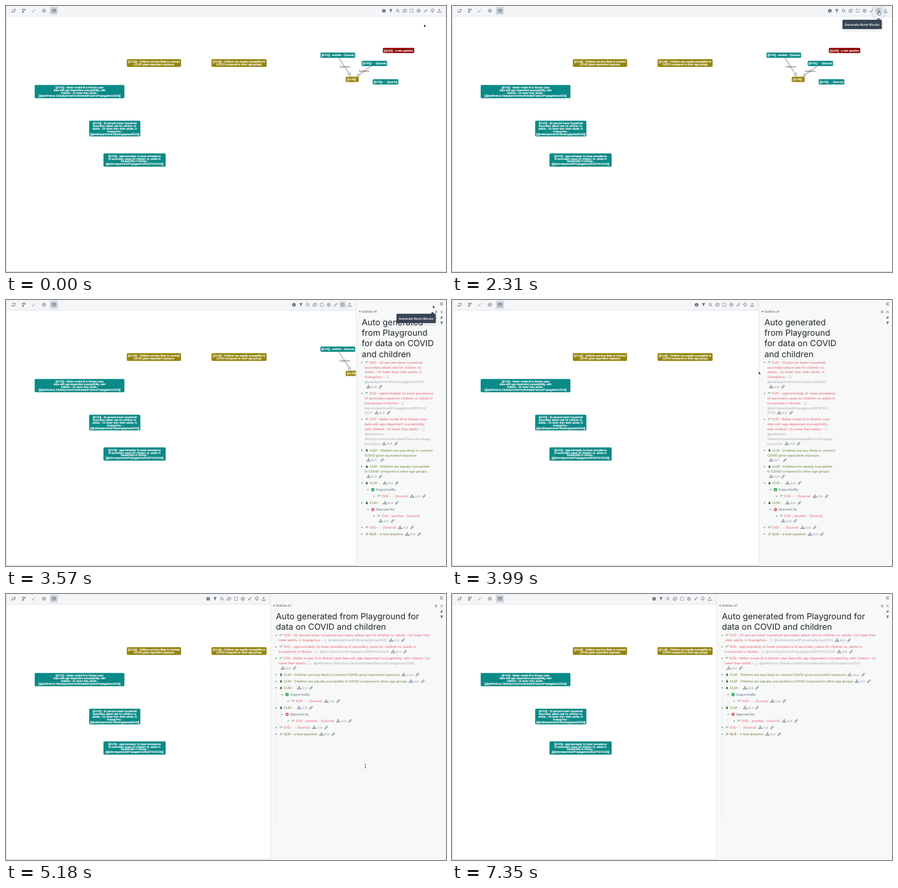
Write an HTML page that moves like this. It is 800x484 px and loops after 7.42 s.

```html
<!DOCTYPE html>
<html lang="en">
<head>
<meta charset="utf-8">
<title>Graph to outline</title>
<style>
html, body { margin: 0; width: 100%; height: 100%; overflow: hidden; background: #fff; }
svg { display: block; }
text { font-family: Inter, sans-serif; text-rendering: geometricPrecision; white-space: pre; }
.node { font: 4.92px "Liberation Sans", Arial, sans-serif; text-anchor: middle; fill: #fff; stroke: #fff; stroke-width: .24px; }
.edge { font: 4.8px "Liberation Sans", Arial, sans-serif; text-anchor: middle; fill: #444; }
.row { font-size: 5.92px; }
.count { font: 5.2px "Liberation Mono", monospace; fill: #7c868e; }
.title { font-size: 15.3px; fill: #20262b; }
.line { fill: none; stroke: #5f6b75; stroke-width: .85; }
.solid { fill: #5f6b75; }
.hover text.row { text-decoration: underline; }
</style>
</head>
<body>
<svg id="stage" width="800" height="484" viewBox="0 0 800 484"></svg>
<script>
const LOOP = 7420, FULL = 800, NARROW = 636.5, WIDE = 480.5;
const TEAL = '#0b8a87', OLIVE = '#94840e', RED = '#8b0000';
const stage = document.getElementById('stage');
const $ = id => document.getElementById(id);

const at = (x, y, body, scale = 1) => `<g transform="translate(${x} ${y}) scale(${scale})">${body}</g>`;
const line = (d, extra = '') => `<path class="line" d="${d}" ${extra}/>`;
const solid = (d, extra = '') => `<path class="solid" d="${d}" ${extra}/>`;
const dot = (r, cls = 'solid') => `<circle r="${r}" class="${cls}"/>`;

const icon = {
  path: solid('M-3.5 1h2v2h-2zM1-3h2v2h-2z') + line('M-1.5 2H2V-1M-3-2H0'),
  branch: line('M-1.5-3V3M-1.5 1.5Q2 1 2-1.5') + solid('M-2.7-3.5h2.2v2h-2.2zM-2.7 1.8h2.2v2h-2.2zM.9-3.2h2.2v2H.9z'),
  pencil: line('M-2.5 2.5L2-2', 'stroke-width="1.6"') + solid('M-3.2 3.2l.4-1.6 1.2 1.2z'),
  wheel: dot(2.9, 'line') + line('M-1.4-1.4L1.4 1.4M1.4-1.4L-1.4 1.4'),
  board: line('M-3-2.5H3V2.5H-3ZM-3-1.2H3M-.8.5H2'),
  info: dot(3.2) + '<path d="M0-1.8V-1M0-.3V1.9" stroke="#fff"/>',
  filter: solid('M-3-3H3L.8 0V3L-.8 2V0Z'),
  search: '<circle cx="-.6" cy="-.6" r="2.2" class="line"/>' + line('M1 1L3.2 3.2'),
  map: line('M-3-1.5V2.5H1M3 1.5V-2.5H-1M-2-3L2 3'),
  select: line('M-2.8-2.8H2.8V2.8H-2.8Z', 'stroke-dasharray="1.6 .8"'),
  target: dot(2.9, 'line') + dot(1.1),
  shrink: line('M.5-.5L3-3M-.5.5L-3 3') + solid('M.2-2.6V-.2H2.6ZM-.2 2.6V.2H-2.6Z'),
  make: line('M-1.5 1H-2.4A1.5 1.5 0 0 1-2-1.6 2 2 0 0 1 2-1.6 1.5 1.5 0 0 1 2.4 1H1.5M0-.5V3M-1.2 1.8L0 3L1.2 1.8'),
  send: line('M-3 1V3H3V1M0 1.5V-3M-1.5-1.5L0-3L1.5-1.5'),
  menu: line('M-3-2H3M-3 0H1.5M-3 2H3'),
  close: line('M-2-2L2 2M2-2L-2 2'),
  pin: solid('M0-2.7L2.7 0 1.6.3 0 2-2-.0-.3-1.6Z') + line('M-1 1L-2.6 2.6'),
  chart: line('M0-2V0M-2.7 1.5V0H2.7V1.5M0 0V1.5', 'style="stroke-width:.6"') + solid('M-.9-3H.9V-1.4H-.9ZM-3.5 1.2H-1.9V2.8H-3.5ZM-.8 1.2H.8V2.8H-.8ZM1.9 1.2H3.5V2.8H1.9Z'),
  link: '<g transform="rotate(-45)"><rect x="-3.4" y="-1.1" width="3.6" height="2.2" rx="1.1" class="line"/><rect x="-.2" y="-1.1" width="3.6" height="2.2" rx="1.1" class="line"/></g>',
  EVD: '<path d="M-2 2.5Q0 1.5 0-.5M0-.5Q-3 .2-3.2-2Q-.4-2.4 0-.5Q.5-3 3-2.4Q2.8 0 0-.5" fill="#79b873" stroke="#79b873" stroke-width=".4"/>',
  CLM: '<path d="M0-3.2L1.7-.6H1L2.5 2H-2.5L-1-.6H-1.7Z" fill="#27603a"/><path d="M-.5 2H.5V3H-.5Z" fill="#6b4a2b"/>',
  YES: '<rect x="-3.2" y="-3.2" width="6.4" height="6.4" rx="1" fill="#35a853"/><path d="M-1.6 0L-.4 1.4L1.7-1.5" fill="none" stroke="#fff" stroke-width=".9"/>',
  NO: '<circle r="3.1" fill="#d8343f"/><path d="M-1.9 0H1.9" stroke="#fff" stroke-width="1.4"/>',
  QUE: '<circle cx=".8" cy="-.8" r="1.7" fill="#d5e6ee" stroke="#666" stroke-width=".7"/><path d="M-.4.4L-2.6 2.6" stroke="#666"/>'
};
const cursors = {
  arrow: '<path d="M0 0V5.6L1.3 4.4L2.2 6.4L3.1 6L2.2 4.1H4Z" fill="#111" stroke="#fff" stroke-width=".5"/>',
  hand: '<path d="M-.7 0Q0-.8.7 0V2.5L3 3.2Q3.6 3.6 3.3 5L2.7 7H-1.2L-3 4.2Q-2.6 3.2-.7 4.4Z" fill="#fff" stroke="#222" stroke-width=".7"/>',
  beam: '<path d="M-1.5-3Q0-3 0-2Q0-3 1.5-3M0-2V3M-1.5 4Q0 4 0 3Q0 4 1.5 4" fill="none" stroke="#222" stroke-width=".7"/>'
};

const MODEL_CITE = ['pellmvirus-', '19studycirclesYouthrelatedFactorsPropaga', 'tions2020'];
const HOME_CITE = '@velkApartmentFollowingSpread2020', RESP_CITE = '@dornApartmentPropagationsRESPVir22020';
const nodes = [
  [220, 97, 98, 13.5, OLIVE, '[[CLM]] - Children are less likely to contract|COVID given equivalent exposure'],
  [374, 97, 99.5, 13.5, OLIVE, '[[CLM]] - Children are equally susceptible to|COVID compared to other age groups'],
  [52.5, 144, 162.5, 23.5, TEAL, '[[EVD]] - Better model fit to Wuhan case|data with age-dependent susceptibility, with|children ~2x lower than adults -|[[@' + MODEL_CITE.join('') + ']]'],
  [151.5, 209, 92.5, 28, TEAL, '[[EVD]] - 30 percent lower household|secondary attack rate for children vs.|adults, ~2x lower than older adults, in|Guangzhou -|[[' + HOME_CITE + ']]'],
  [177.5, 268.5, 112.5, 23.5, TEAL, '[[EVD]] - approximately 2x lower prevalence|of secondary cases for children vs. adults in|households in Wuhan -|[[' + RESP_CITE + ']]'],
  [572, 85, 62.5, 9, TEAL, '[[EVD]] - another - (Source)'],
  [647, 100, 45.5, 9, TEAL, '[[EVD]] -  - (Source)'],
  [685.5, 76.5, 56.5, 8.7, RED, '[[QUE]] - a new question'],
  [667, 133.5, 46, 9, TEAL, '[[EVD]] -  - (Source)'],
  [618, 129, 23, 9, OLIVE, '[[CLM]] -']
];
function drawNode([x, y, w, h, color, label]) {
  const lines = label.split('|');
  return `<rect x="${x}" y="${y}" width="${w}" height="${h}" rx="1.5" fill="${color}" stroke="${color}" stroke-opacity=".6"/>` +
    lines.map((s, i) => `<text class="node" x="${x + w / 2}" y="${y + h / 2 + 1.75 + (i - (lines.length - 1) / 2) * 4.9}">${s}</text>`).join('');
}

// kind, indent, narrow lines, wide lines, count; "{" starts grey citation text
const rows = [
  ['EVD', 0, `EVD - 30 percent lower household|secondary attack rate for children vs.|adults, ~2x lower than older adults, in|Guangzhou - {❏|{${HOME_CITE}|`,
    `EVD - 30 percent lower household secondary attack rate for children vs. adults, ~2x lower than|older adults, in Guangzhou - {❏  ${HOME_CITE}`, '8|5'],
  ['EVD', 0, `EVD - approximately 2x lower prevalence|of secondary cases for children vs. adults in|households in Wuhan - {❏|{${RESP_CITE.slice(0, -4)}|{2020`,
    `EVD - approximately 2x lower prevalence of secondary cases for children vs. adults in|households in Wuhan - {❏  ${RESP_CITE}`, '8|5'],
  ['EVD', 0, `EVD - Better model fit to Wuhan case|data with age-dependent susceptibility,|with children ~2x lower than adults - {❏|{@${MODEL_CITE.join('|{')}`,
    `EVD - Better model fit to Wuhan case data with age-dependent susceptibility, with children ~2x|lower than adults - {❏  @${MODEL_CITE.join('')}|`, '8|5'],
  ['CLM', 0, 'CLM - Children are less likely to contract|COVID given equivalent exposure|', 'CLM - Children are less likely to contract COVID given equivalent exposure', '14|3'],
  ['CLM', 0, 'CLM - Children are equally susceptible|to COVID compared to other age groups|', 'CLM - Children are equally susceptible to COVID compared to other age groups', '3|5'],
  ['CLM', 0, 'CLM -  ', 'CLM -  ', '0|0'],
  ['YES', 1, 'SupportedBy', 'SupportedBy'],
  ['EVD', 2, 'EVD -  - (Source)', 'EVD -  - (Source)', '1|0'],
  ['CLM', 0, 'CLM -  ', 'CLM -  ', '0|0'],
  ['NO', 1, 'Opposed By', 'Opposed By'],
  ['EVD', 2, 'EVD - another - (Source)|', 'EVD - another - (Source)', '1|0'],
  ['EVD', 0, 'EVD -  - (Source)', 'EVD -  - (Source)', '1|0'],
  ['QUE', 0, 'QUE - a new question', 'QUE - a new question', '0|0']
];
const rowStyle = {
  EVD: 'fill="#e65a6b"', CLM: 'fill="#7f9350" font-weight="500"', QUE: 'fill="#87854a" font-weight="500"',
  YES: 'fill="#587489"', NO: 'fill="#587489"'
};

const probe = document.createElementNS('http://www.w3.org/2000/svg', 'text');
function textWidth(s, weight) {
  probe.setAttribute('class', 'row');
  probe.setAttribute('font-weight', weight);
  probe.textContent = s.replace('{', '');
  stage.append(probe);
  const w = probe.getComputedTextLength();
  probe.remove();
  return w;
}
function drawRows(wide) {
  let y = wide ? 75.3 : 113.6;
  return rows.map(([kind, indent, narrowText, wideText, count], n) => {
    const x = 15.5 + indent * 11, lines = (wide ? wideText : narrowText).split('|');
    let body = at(x - 5, y, dot(1)) + at(x + 4, y, icon[kind], .88), end = x;
    lines.forEach((s, i) => {
      if (i) y += 8.85;
      const left = i ? x : x + 9.2, [main, cite] = s.split('{');
      end = left + (s ? textWidth(s, /CLM|QUE/.test(kind) ? 500 : 400) : 0);
      body += `<text class="row" x="${left}" y="${y + 2.1}" ${rowStyle[kind]}>${main}${cite ? `<tspan fill="#a4a8ab">${cite}</tspan>` : ''}</text>`;
    });
    if (count) body += at(end + 7.2, y, icon.chart) +
      `<text class="count" x="${end + 12.5}" y="${y + 1.8}">${wide ? count : '0|0'}</text>` +
      at(end + (count.length > 3 ? 32 : 28.8), y, icon.link);
    y += 12.03;
    return `<g id="${wide ? 'w' : 'n'}${n}">${body}</g>`;
  }).join('');
}
const drawTitle = lines => lines.map((s, i) => `<text class="title" x="10.3" y="${45.6 + i * 19.4}">${s}</text>`).join('');
const guides = '<path d="M10.5 175V415M21 187V200M21 223V236" stroke="#e2e6e8" stroke-width=".7"/>';

const leftTools = ['path', 'branch', 'pencil', 'wheel', 'board'];
const rightTools = ['info', 'filter', 'search', 'map', 'select', 'target', 'shrink', 'make', 'send'];

stage.innerHTML = `
<rect width="800" height="484" fill="#fff"/>
<path d="M605 94L624.5 124M664 109L642 125" stroke="#c9c9c9" stroke-width="2.4"/>
<path d="M627 129L620.5 124.2L627.3 120Z M637 129L640 121.5L645 127.8Z" fill="#c9c9c9"/>
<text class="edge" x="616" y="112.3">Opposes</text><text class="edge" x="651" y="119.8">Supports</text>
${nodes.map(drawNode).join('')}
<rect width="800" height="18.5" fill="#f3f5f7"/><path d="M0 18.8H800" stroke="#d9dee2" stroke-width=".8"/>
<rect x="80" y="1.5" width="14" height="14" rx="1.5" fill="#ccd4db"/>
${leftTools.map((k, i) => at(14 + i * 18.3, 8.5, icon[k])).join('')}
<g id="tools"><rect id="active" x="769.5" y="2.5" width="12" height="12" rx="1.5" fill="#d5dde3"/>
${rightTools.map((k, i) => at(687 + i * 12.63, 8.7, icon[k])).join('')}</g>
<path d="M.4 0V484M0 483.5H800" stroke="#c4c8cb" stroke-width=".8"/>
<g id="panel">
  <rect width="320" height="484" fill="#f7f8f8"/><path d="M.4 0V484" stroke="#dde1e4" stroke-width=".8"/>
  ${solid('M5 20.3H9L7 22.8Z')}<text x="10.5" y="23.4" font-size="5.8" fill="#4c555c">Outline of:</text>
  <g id="narrow">${drawTitle(['Auto generated', 'from Playground', 'for data on COVID', 'and children'])}${drawRows(false)}</g>
  <g id="wide">${guides}${drawTitle(['Auto generated from Playground for', 'data on COVID and children'])}${drawRows(true)}
    ${solid('M2 169.6H6L4 172.1Z', 'id="caret"')}</g>
</g>
<g id="corner">${at(792, 7, icon.menu)}${at(782, 21.7, '<circle r="1.6" class="line"/>' + line('M0-2.8V-1.6M0 1.6V2.8'))}
${at(792, 21.7, icon.close)}${at(792, 32, icon.pin)}${at(792, 42, icon.filter, .9)}</g>
<g id="tip"><rect x="708" y="25" width="77" height="22" rx="7" fill="#000" opacity=".05"/>
<path d="M771 26L775.5 21.5L780 26Z" fill="#394555"/><rect x="710" y="25" width="71.5" height="17" rx="1.5" fill="#394555"/>
<text x="745.8" y="35.6" text-anchor="middle" font-size="5.8" font-weight="600" fill="#f5f8fa">Generate Nurm Blocks</text></g>
<circle id="ring" cx="776" cy="11" fill="#9db4d01c" stroke="#a9bdd6" stroke-width=".9"/>
<g id="cursor">${Object.entries(cursors).map(([k, c]) => `<g id="${k}">${c}</g>`).join('')}</g>`;

const moves = [
  [0, 760, 33, 'arrow'], [560, 760, 33, 'arrow'], [1120, 776, 9.5, 'hand'], [3500, 776, 9.5, 'arrow'],
  [3600, 776, 9.5, 'arrow'], [3780, 636.5, 130, 'arrow'], [3850, 636.5, 130, 'arrow'], [4130, 480.5, 130, 'arrow'],
  [4200, 480.5, 130, 'arrow'], [4620, 724, 142, 'hand'], [4830, 724, 142, 'beam'], [5300, 640, 345, 'beam'],
  [5740, 628, 174, 'beam'], [6020, 628, 174, 'beam'], [6440, 650, 443, 'beam'], [LOOP, 650, 443, 'beam']
];
const ramp = (t, a, b) => Math.min(1, Math.max(0, (t - a) / (b - a)));
const ease = p => p * p * (3 - 2 * p);
const show = (id, on) => $(id).setAttribute('visibility', on ? 'inherit' : 'hidden');
const shift = (id, x, y) => $(id).setAttribute('transform', `translate(${x} ${y})`);

function draw() {
  const t = performance.now() % LOOP, open = t >= 3500;
  const left = open ? NARROW + (WIDE - NARROW) * ease(ramp(t, 3850, 4130)) : FULL;
  const isWide = left < 545;
  shift('panel', left, 0);
  shift('tools', left - FULL, 0);
  show('panel', open);
  show('corner', open);
  show('narrow', open && !isWide);
  show('wide', open && isWide);
  show('active', t > 1100 && t < 3700);
  show('caret', t >= 5700 && t < 6100);
  $('w2').classList.toggle('hover', t >= 4550 && t < 4830);

  const tip = ramp(t, 1050, 1210) * (1 - ramp(t, 3620, 3720));
  $('tip').setAttribute('opacity', tip);
  const click = ramp(t, 2200, 2480);
  show('ring', click > 0 && click < 1);
  $('ring').setAttribute('r', 9 + click * 10);
  $('ring').setAttribute('opacity', 1 - click * click);

  const i = moves.findIndex((m, k) => k && t < m[0]) - 1;
  const [t0, x0, y0, kind] = moves[i], [t1, x1, y1] = moves[i + 1];
  const p = ease(ramp(t, t0, t1));
  shift('cursor', x0 + (x1 - x0) * p, y0 + (y1 - y0) * p);
  for (const k in cursors) show(k, k === kind && t < 6510);
  requestAnimationFrame(draw);
}
draw();
</script>
</body>
</html>
```
